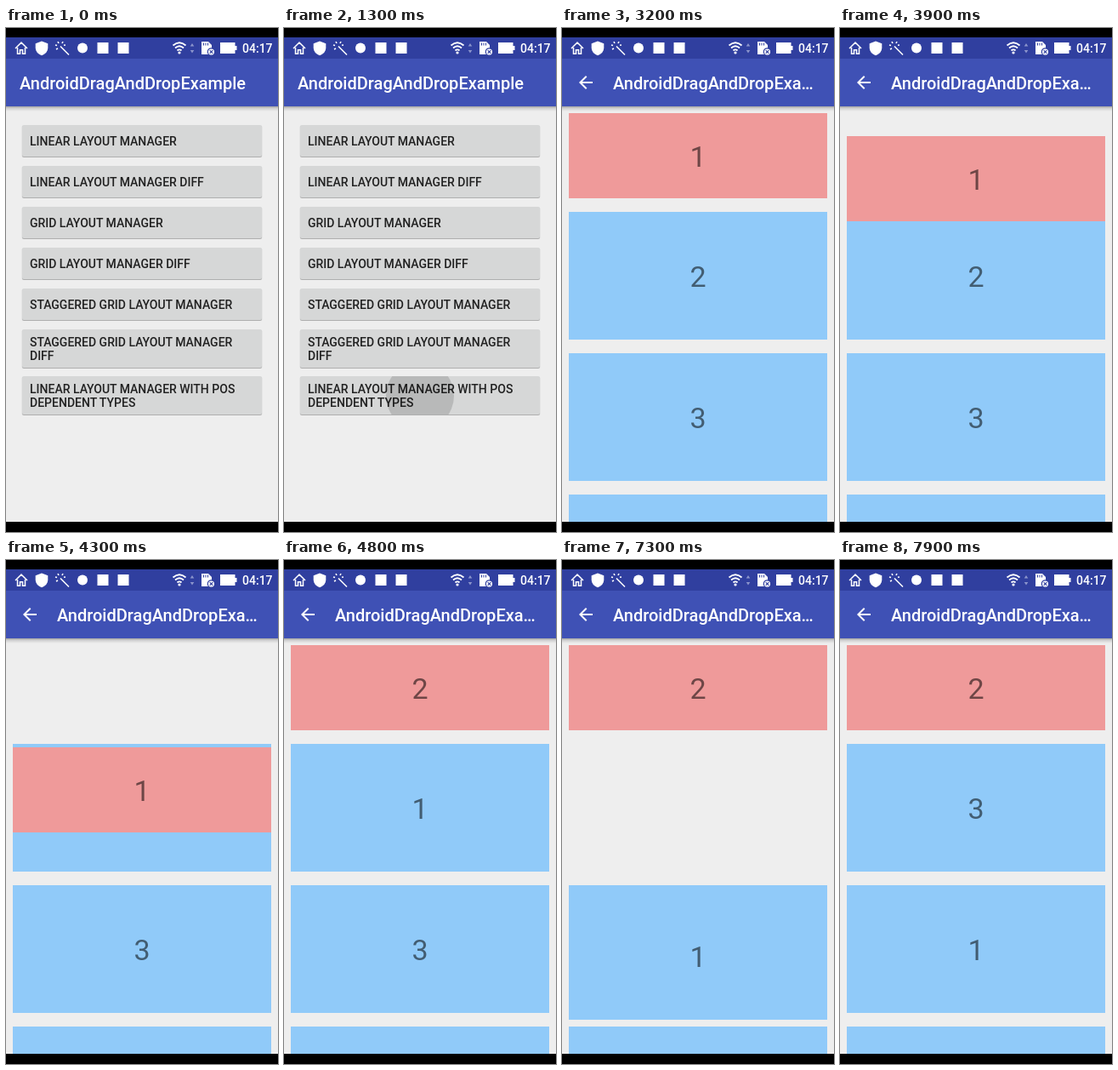
Write an HTML page that moves like this. It is 320x592 px and loops after 8000 ms.

```html
<!DOCTYPE html>
<html lang="en">
<head>
<meta charset="utf-8">
<title>Drag and drop</title>
<style>
html, body { margin: 0; width: 100%; height: 100%; overflow: hidden; background: #000; }
svg { display: block; width: 100%; height: 100%; font-family: Roboto, sans-serif; }
.title { font-size: 20px; font-weight: 500; fill: #fff; }
.label { font-size: 14px; font-weight: 500; fill: #212121; }
.digit { font-size: 34px; text-anchor: middle; fill: #000; fill-opacity: .54; }
.clock { font-size: 14px; font-weight: 500; fill: #fff; }
</style>
</head>
<body>
<svg viewBox="0 0 320 592">
  <defs>
    <linearGradient id="shade" x2="0" y2="1">
      <stop offset="0" stop-opacity=".32"/>
      <stop offset=".4" stop-opacity=".12"/>
      <stop offset="1" stop-opacity="0"/>
    </linearGradient>
    <clipPath id="screen"><rect y="11" width="320" height="569"/></clipPath>
    <clipPath id="pressed"><rect x="19" y="409" width="282" height="45" rx="2"/></clipPath>
    <g id="bars">
      <rect y="11" width="320" height="25" fill="#303f9f"/>
      <rect y="36" width="320" height="56" fill="#3f51b5"/>
      <rect y="92" width="320" height="6" fill="url(#shade)"/>
    </g>
  </defs>
  <rect width="320" height="592"/>
  <g clip-path="url(#screen)">
    <g id="menu">
      <rect y="11" width="320" height="569" fill="#eee"/>
      <g id="buttons"></g>
      <g clip-path="url(#pressed)"><circle id="ripple" cx="160" cy="432"/></g>
      <use href="#bars"/>
      <text class="title" x="16" y="72">AndroidDragAndDropExample</text>
    </g>
    <g id="list">
      <rect y="11" width="320" height="569" fill="#eee"/>
      <g id="cards"></g>
      <use href="#bars"/>
      <path transform="translate(16 52)" fill="#fff" d="M20 11H7.83l5.59-5.59L12 4l-8 8 8 8 1.41-1.41L7.83 13H20z"/>
      <text class="title" x="60" y="72">AndroidDragAndDropExa…</text>
    </g>
    <g id="status" fill="#fff">
      <path d="M11 24l7-7 7 7M13.5 23v7.3h3v-4.5h3v4.5h3V23" fill="none" stroke="#fff" stroke-width="1.5"/>
      <path d="M42 15.5l7.3 2.7v5q0 6-7.3 9-7.3-3-7.3-9v-5z"/>
      <path d="M64 21.5l10 10M58 20l2 .6M61 16l1 2M67 16l-1 2M59 25l2-1M70 20l-2 .3" fill="none" stroke="#fff" stroke-width="1.6"/>
      <circle cx="90" cy="23.5" r="6"/>
      <rect x="107.5" y="17" width="13" height="13"/>
      <rect x="131.500" y="17" width="13" height="13"/>
      <g fill="none" stroke="#fff" stroke-width="1.8">
        <path d="M196.500 20.500q7.500-6.500 15 0M199 23.500q5-4.500 10 0M201.500 26.500q2.500-2.300 5 0"/>
      </g>
      <circle cx="204" cy="29" r="1.6"/>
      <path d="M216.700 21.500l2.300-3.500 2.300 3.500zM216.700 26l2.300 3.500 2.300-3.500z" fill="#8c95cc"/>
      <path d="M230 16h8l4 4v11h-12z"/>
      <path d="M232.500 17.500v3M235 17.500v3M237.500 17.500v3" stroke="#303f9f"/>
      <circle cx="241.500" cy="28" r="4.200" stroke="#303f9f" stroke-width="1.200"/>
      <path d="M239.700 26.200l3.600 3.600m0-3.600l-3.600 3.600" stroke="#303f9f" stroke-width="1.200"/>
      <path d="M252 17h17.500v4h2v5h-2v4H252z"/>
      <text class="clock" x="278" y="28.500">04:17</text>
    </g>
  </g>
</svg>
<script>
const $ = id => document.getElementById(id);

function add(parent, tag, attrs, text) {
  const el = document.createElementNS('http://www.w3.org/2000/svg', tag);
  for (const k in attrs) el.setAttribute(k, attrs[k]);
  if (text) el.textContent = text;
  return parent.appendChild(el);
}

const buttons = [
  [114, 'LINEAR LAYOUT MANAGER'],
  [162, 'LINEAR LAYOUT MANAGER DIFF'],
  [210, 'GRID LAYOUT MANAGER'],
  [258, 'GRID LAYOUT MANAGER DIFF'],
  [306, 'STAGGERED GRID LAYOUT MANAGER'],
  [354, 'STAGGERED GRID LAYOUT MANAGER', 'DIFF'],
  [409, 'LINEAR LAYOUT MANAGER WITH POS', 'DEPENDENT TYPES']
];
for (const [y, ...lines] of buttons) {
  const box = { x: 19, width: 282, height: lines.length > 1 ? 45 : 37, rx: 2 };
  add($('buttons'), 'rect', { ...box, x: 18.5, width: 283, y: y + .5, height: box.height + .5, fill: '#000', opacity: .08 });
  add($('buttons'), 'rect', { ...box, y: y + 1, fill: '#000', opacity: .2 });
  add($('buttons'), 'rect', { ...box, y, fill: '#d6d7d7' });
  lines.forEach((s, i) =>
    add($('buttons'), 'text', { class: 'label', x: 28, y: y + (lines.length > 1 ? 20 : 24) + 16 * i }, s));
}

function card(n, red) {
  const g = add($('cards'), 'g'), height = red ? 100 : 150;
  add(g, 'rect', { x: 8, width: 304, height, fill: red ? '#ef9a9a' : '#90caf9' });
  add(g, 'text', { class: 'digit', x: 160, y: height / 2 + 13 }, n);
  return g;
}
const four = card('4'), three = card('3'), blue2 = card('2'), red2 = card('2', true),
      red1 = card('1', true), blue1 = card('1');

function place(el, y, alpha = 1) {
  el.setAttribute('transform', `translate(0 ${y})`);
  el.setAttribute('opacity', alpha);
}

const part = (t, start, length) => Math.min(1, Math.max(0, (t - start) / length));
const drag = u => u * u * u * (u * (6 * u - 15) + 10);
const settle = u => (1 - Math.cos(Math.PI * u)) / 2;

function draw(t) {
  const press = part(t, 1250, 350);
  $('ripple').setAttribute('r', 20 + 140 * press);
  $('ripple').setAttribute('opacity', press ? .14 * (1 - part(t, 1500, 250)) : 0);

  // The list screen rises by 8% of the height while fading in
  const rise = 45.5 * (1 - part(t, 1655, 350)) ** 5;
  place($('list'), Math.round(rise), 1 - (1 - part(t, 1655, 200)) ** 4);

  const swap = settle(part(t, 4550, 250));
  const move = settle(part(t, 7450, 350));
  const y1 = 100 + 130 * drag(part(t, 3600, 900)) - 14 * swap
           + 176 * drag(part(t, 6500, 900)) - 10 * move;
  const y2 = 216 - 116 * swap;
  place(red1, Math.round(y1), 1 - swap);
  place(blue1, Math.round(y1), swap);
  place(blue2, y2, 1 - swap);
  place(red2, y2, swap);
  place(three, 382 - 166 * move);
  place(four, 548);
}

const begin = performance.now();
function tick() {
  const t = (performance.now() - begin) % 8000;
  draw(Math.floor(t / 100) * 100);
  requestAnimationFrame(tick);
}
tick();
</script>
</body>
</html>
```
